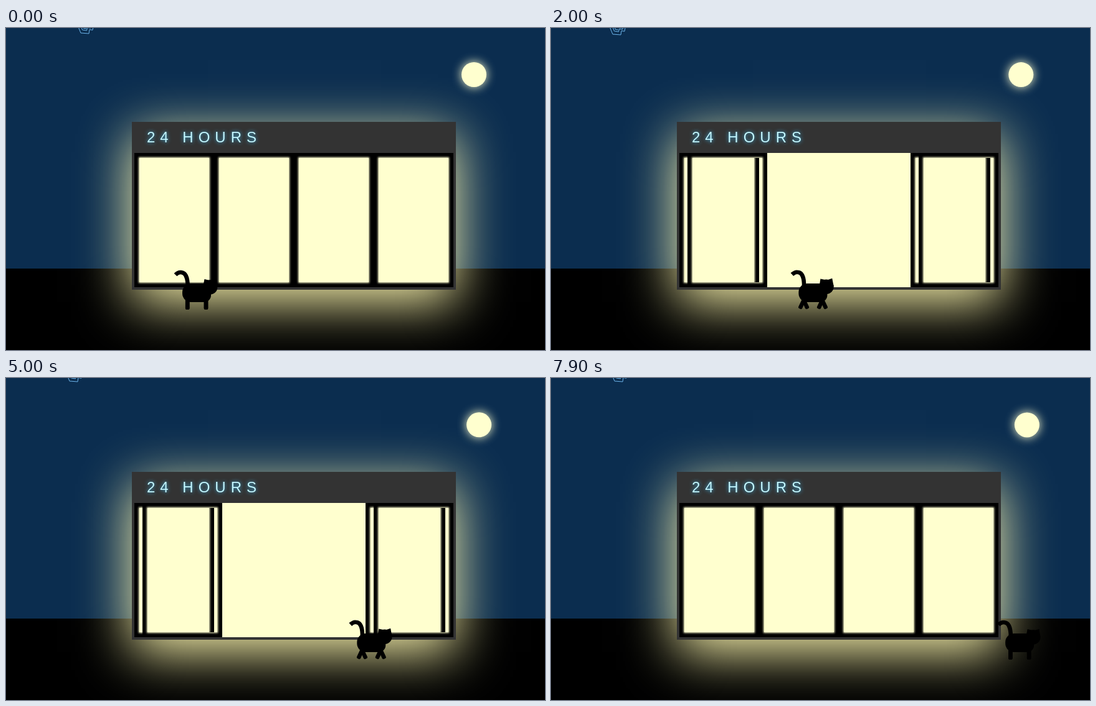
These frames come from a looping animation (865 px wide and 518 px high, 8 s). An HTML page with a canvas:

```html
<!DOCTYPE html>
<html lang="en">
<head>
<meta charset="utf-8">
<title>Night shop</title>
<style>
  html, body { margin: 0; width: 100%; height: 100%; overflow: hidden; }
  body { position: relative; background: #0b2d4f; }
  div, canvas { position: absolute; box-sizing: border-box; }
  .ground { left: 0; right: 0; top: 387px; bottom: 0; background: #000; }
  .moon {
    left: 731px; top: 55px; width: 40px; height: 40px;
    border-radius: 50%; background: #ffffcf; box-shadow: 0 0 16px #ffffcf;
  }
  .shop {
    left: 202px; top: 151px; width: 520px; height: 270px;
    background: #333; box-shadow: 0 20px 80px #fff9b0;
  }
  .sign {
    left: 24px; top: 0; white-space: pre;
    font: 24px/50px "Liberation Sans", Arial, sans-serif; letter-spacing: 8px;
    color: #c2f6ff; text-shadow: 0 0 6px #3cb4e6;
  }
  .front { left: 4px; top: 50px; width: 512px; height: 216px; background: #ffffcf; }
  .door { top: 0; width: 128px; height: 216px; border: 8px solid #000; }
  .pane { inset: 0; box-shadow: 0 0 3px 1px #ffffcf; }
  canvas { left: 0; top: 0; }
</style>
</head>
<body>
<div class="ground"></div>
<div class="moon"></div>
<div class="shop">
  <div class="sign">24 HOURS</div>
  <div class="front"></div>
</div>
<canvas width="865" height="518"></canvas>
<script>
const LOOP = 8000, STEP = 100;
const ctx = document.querySelector('canvas').getContext('2d');
const moon = document.querySelector('.moon');
const front = document.querySelector('.front');

const doors = [0, 1, 2, 3].map(i => {
  const door = document.createElement('div');
  door.className = 'door';
  door.style.left = i * 128 + 'px';
  door.innerHTML = '<div class="pane"></div>';
  front.append(door);
  return door;
});

const clamp = x => Math.min(1, Math.max(0, x));

// cubic-bezier(.25, .1, .25, 1)
function ease(x) {
  if (x <= 0 || x >= 1) return clamp(x);
  let lo = 0, hi = 1, u = 0.5;
  for (let i = 0; i < 24; i++) {
    u = (lo + hi) / 2;
    const bx = 0.75 * u * (1 - u) + u * u * u;
    if (bx < x) lo = u; else hi = u;
  }
  return 0.3 * u * (1 - u) ** 2 + 3 * u * u * (1 - u) + u ** 3;
}

// Piecewise linear path through [time, x, y] points
function along(points, t) {
  if (t <= points[0][0]) return points[0].slice(1);
  for (let i = 1; i < points.length; i++) {
    const [t0, x0, y0] = points[i - 1], [t1, x1, y1] = points[i];
    if (t <= t1) {
      const k = (t - t0) / (t1 - t0);
      return [x0 + (x1 - x0) * k, y0 + (y1 - y0) * k];
    }
  }
  return points[points.length - 1].slice(1);
}

function rotated(x, y, deg, draw) {
  ctx.save();
  ctx.translate(x, y);
  ctx.rotate(deg * Math.PI / 180);
  draw();
  ctx.restore();
}

function box(x, y, w, h, r) {
  ctx.beginPath();
  ctx.roundRect(x, y, w, h, r);
  ctx.fill();
}

function trace(points) {
  ctx.beginPath();
  points.forEach(([x, y]) => ctx.lineTo(x, y));
}

function drawCat(x, stride) {
  ctx.save();
  ctx.translate(x, 411);
  ctx.fillStyle = ctx.strokeStyle = '#000';
  box(0, 0, 46, 30, [14, 14, 11, 14]);

  for (const legX of [8.2, 38]) {
    for (const side of [-1, 1]) {
      rotated(legX, 27, side * 25 * stride, () => box(-3.3, -3, 6.6, 18, 2.5));
    }
  }

  rotated(8, 3, 1.5 * stride, () => {
    ctx.lineWidth = 6.6;
    ctx.beginPath();
    ctx.moveTo(-19, -17);
    ctx.quadraticCurveTo(-14, -22, -9, -20.7);
    ctx.bezierCurveTo(-3, -20, 0.7, -12, 0.7, 2);
    ctx.stroke();
  });

  rotated(44.5, 6 - 0.8 * stride, -2 * stride, () => {
    ctx.beginPath();
    ctx.arc(0, 0, 11.8, 0, 7);
    ctx.fill();
    trace([[-11.5, 0], [-9, -13], [-2, -11.2], [3, -11.2], [9.8, -13], [11.8, 0]]);
    ctx.fill();
  });
  ctx.restore();
}

const KITE_PATH = [
  [0.9, 0, 0], [1.2, -13, 3], [1.5, -21, 2],
  [2.6, -21, 2], [3.2, -5, 0], [3.5, -18, -3]
];

function drawKite(t) {
  const [x, y] = along(KITE_PATH, t);
  ctx.save();
  ctx.translate(x, y);
  ctx.strokeStyle = '#6db4ea';
  ctx.lineWidth = 1;
  trace([[113, -9], [120, 8], [133, 9], [134, 2.5], [139, 3.3], [141, -8]]);
  ctx.stroke();
  trace([[120, -4], [122.5, 3], [129.5, 4], [130.5, -0.5], [136, 0], [137, -6]]);
  ctx.stroke();
  trace([[123, -4], [124.5, 0.5], [129, 1]]);
  ctx.stroke();
  ctx.restore();
}

function render(now) {
  const n = Math.floor(now % LOOP / STEP);
  // The scene pauses briefly, then runs on slightly late
  const beat = n < 24 ? n : n < 28 ? 24 : n - 1;
  const t = beat / 10;

  moon.style.transform = `translate(${1.65 * t}px, ${0.06 * t}px)`;

  const open = 115.2 * (ease((t - 0.76) / 0.5) - ease((t - 5.985) / 0.5));
  doors[1].style.left = 128 - open + 'px';
  doors[2].style.left = 256 + open + 'px';

  ctx.clearRect(0, 0, 865, 518);
  drawKite(t);
  drawCat(283 + 57.2 * t, beat % 3 ? 1 : 0);
  requestAnimationFrame(render);
}
requestAnimationFrame(render);
</script>
</body>
</html>
```
